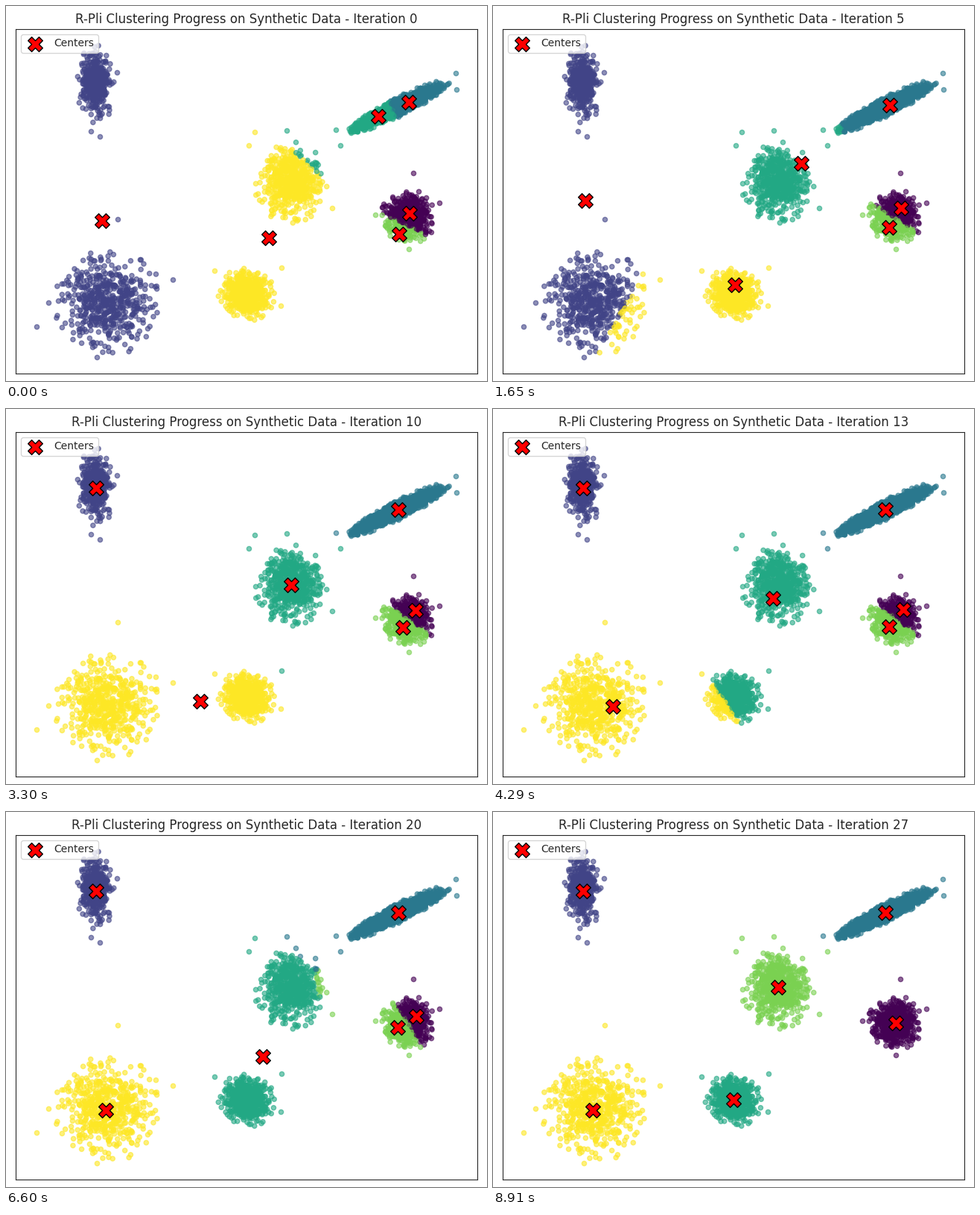
Write a matplotlib script that moves like this. It is 646 by 503 pixels and loops after 9240 ms.

```python
import numpy as np
import matplotlib.pyplot as plt
from matplotlib.animation import FuncAnimation

W, H, DPI = 646, 503, 100
STEPS, INTERVAL = 28, 330
INK = "0.15"

plt.rcParams.update({"font.family": "DejaVu Sans", "text.color": INK,
                     "axes.edgecolor": INK, "axes.titlecolor": INK})

rng = np.random.default_rng(7)


def blob(n, center, sx, sy, strays, corr=0):
    """Gaussian cloud with a cut tail, plus a few far points (in pixels)."""
    z = rng.normal(size=(n, 2))
    z = z[np.hypot(*z.T) < 2.75]
    x = center[0] + sx * z[:, 0]
    y = center[1] + sy * (corr * z[:, 0] + np.sqrt(1 - corr**2) * z[:, 1])
    return np.vstack([np.column_stack([x, y]), strays])


points = np.vstack([
    blob(420, (120, 105), 9.6, 20, [(126, 175), (114, 168), (149, 89)]),
    blob(570, (134, 398), 29, 26.5,
         [(150, 286), (41, 430), (224, 367), (122, 471)]),
    blob(600, (382, 235), 18.5, 20.5,
         [(334, 169), (326, 187), (377, 167), (438, 271)]),
    blob(600, (323, 386), 14, 13.5, [(280, 355), (370, 351), (369, 402)]),
    blob(570, (540, 282), 13.5, 14,
         [(547, 224), (582, 264), (541, 326), (496, 280)]),
    blob(2000, (526, 135), 25.5, 13.2,
         [(449, 187), (443, 166), (604, 90), (605, 112)], corr=-0.92),
])

# Center paths as (iteration, x, y), in label order
paths = [
    [(0, 541, 278), (3, 547, 271), (13, 550, 269), (23, 551, 276),
     (27, 540, 283)],
    [(0, 128, 288), (3, 125, 282), (7, 121, 240), (10, 120, 106)],
    [(0, 540, 129), (3, 544, 127), (6, 526, 135)],
    [(0, 499, 148), (3, 473, 165), (5, 413, 211), (7, 382, 236),
     (10, 382, 236), (13, 375, 254), (15, 346, 323), (23, 343, 331),
     (27, 322, 386)],
    [(0, 527, 306), (7, 533, 293), (17, 530, 291), (23, 520, 286),
     (25, 480, 270), (27, 382, 235)],
    [(0, 352, 311), (3, 332, 360), (7, 317, 387), (10, 260, 392),
     (13, 160, 399), (15, 133, 400)],
]


def centers_at(step):
    out = []
    for path in paths:
        t, x, y = np.transpose(path)
        out.append((np.interp(step, t, x), np.interp(step, t, y)))
    return np.array(out)


def labels_for(centers):
    gap = points[:, None, :] - centers[None, :, :]
    return (gap**2).sum(axis=2).argmin(axis=1)


fig = plt.figure(figsize=(W / DPI, H / DPI), dpi=DPI, facecolor="white")
ax = fig.add_axes([13 / W, 10 / H, 620 / W, 462 / H])
ax.set(xticks=[], yticks=[])

first = centers_at(0)
dots = ax.scatter(*points.T, c=labels_for(first), cmap="viridis",
                  vmin=0, vmax=5, s=20, alpha=0.6)
marks = ax.scatter(*first.T, c="red", marker="X", s=200,
                   edgecolors="black", label="Centers")
ax.set(xlim=(12.5, 632.5), ylim=(492.5, 30.5))
ax.legend(loc="upper left")
title = ax.set_title("")


def update(step):
    centers = centers_at(step)
    dots.set_array(labels_for(centers))
    marks.set_offsets(centers)
    title.set_text("R-Pli Clustering Progress on Synthetic Data"
                   f" - Iteration {step}")
    return dots, marks, title


anim = FuncAnimation(fig, update, frames=STEPS, interval=INTERVAL,
                     repeat=True)
plt.show()
```
